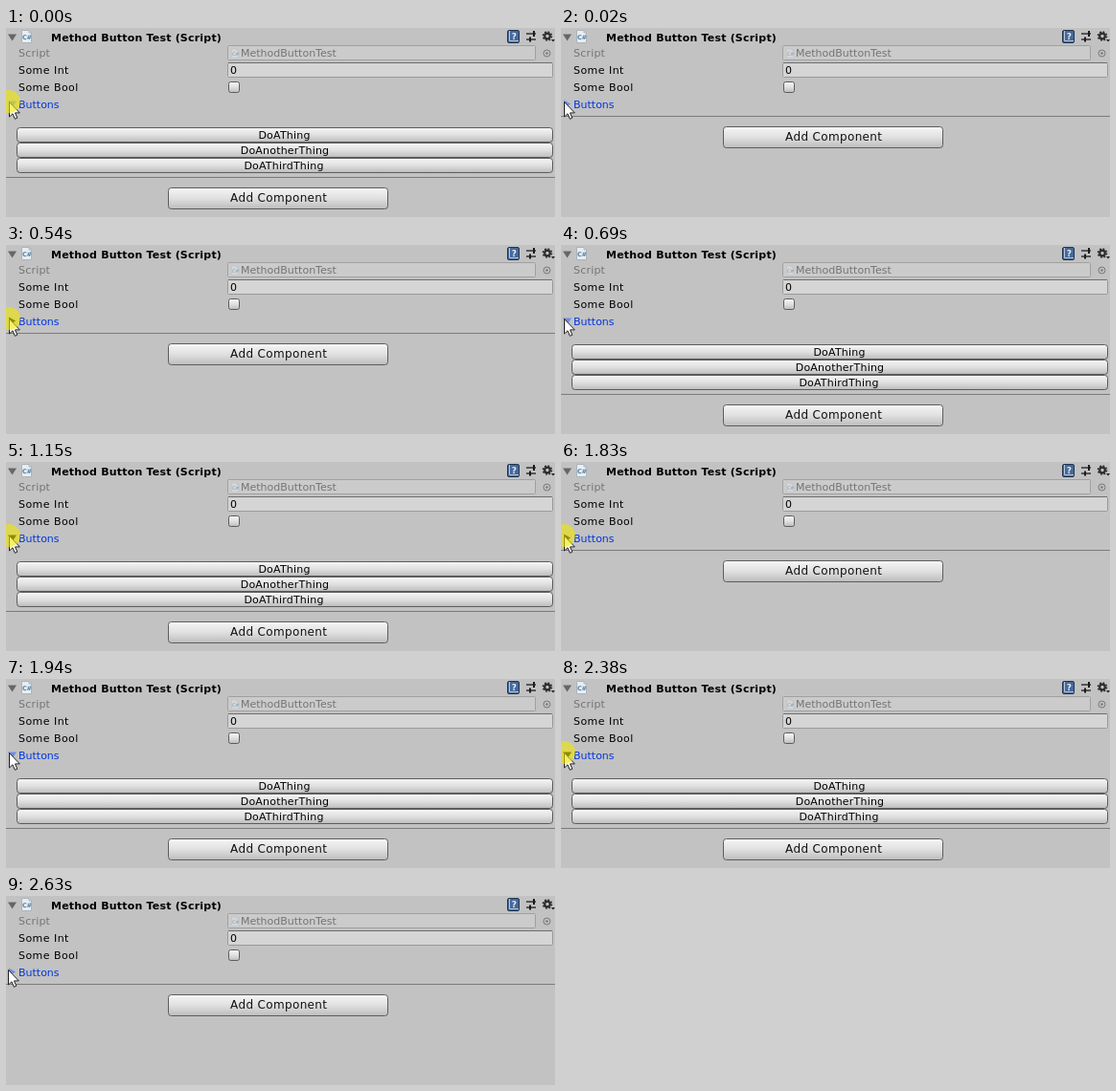
Write an HTML page that moves like this. It is 573 px wide and 198 px high and loops after 2.78 s.

```html
<!DOCTYPE html>
<html lang="en">
<head>
<meta charset="utf-8">
<title>Method Button Test</title>
<style>
  html, body { margin: 0; width: 100%; height: 100%; overflow: hidden; background: #c2c2c2; }
  svg { display: block; width: 573px; height: 198px; }
  text { font: 11px "DejaVu Sans", sans-serif; letter-spacing: .2px; }
  .label { letter-spacing: .45px; }
  .title { font-weight: bold; }
  .dim { fill: #747474; }
  .focus { fill: #0035e0; }
  .tight { letter-spacing: 0; }
  .mid { text-anchor: middle; }
  .add { font-size: 12px; letter-spacing: .35px; fill: #111; }
  .btn { fill: url(#face); stroke: #5c5c5c; }

  .open, .closed, .footer, .glow, .arrow, .cursor { animation: 2780ms step-end infinite; }
  .open { animation-name: open; }
  .closed { animation-name: closed; }
  .footer { animation-name: footer; }
  .glow { animation-name: glow; }
  .arrow { animation-name: arrow; }
  .cursor { animation-name: cursor; }

  @keyframes open {
    0%, 24.8201%, 69.7842% { visibility: visible; }
    .7194%, 48.5612%, 91.0072%, 100% { visibility: hidden; }
  }
  @keyframes closed {
    0%, 24.8201%, 69.7842% { visibility: hidden; }
    .7194%, 48.5612%, 91.0072%, 100% { visibility: visible; }
  }
  @keyframes footer {
    0%, 24.8201%, 69.7842% { transform: none; }
    .7194%, 48.5612%, 91.0072%, 100% { transform: translateY(-64px); }
  }
  @keyframes glow {
    0%, 19.4245%, 41.3669%, 65.8273%, 85.6115% { visibility: visible; }
    .7194%, 24.8201%, 48.5612%, 69.7842%, 91.0072%, 100% { visibility: hidden; }
  }
  @keyframes arrow {
    0%, .7194%, 24.8201%, 48.5612%, 69.7842%, 91.0072%, 100% { fill: #6f8ee0; }
    19.4245%, 41.3669%, 65.8273%, 85.6115% { fill: #000; }
  }
  @keyframes cursor {
    0% { transform: none; }
    94.6043%, 100% { transform: translateX(-1px); }
  }
</style>
</head>
<body>
<svg viewBox="0 0 573 198">
  <defs>
    <linearGradient id="face" x2="0" y2="1">
      <stop offset="0" stop-color="#f6f6f6"/>
      <stop offset=".5" stop-color="#e0e0e0"/>
      <stop offset="1" stop-color="#bcbcbc"/>
    </linearGradient>
    <g id="page">
      <path d="M.5 .5H8L10.500 3V13.500H.5Z" fill="#e9edf0" stroke="#aab4bc"/>
      <path d="M8 .5V3H10.500" fill="none" stroke="#aab4bc"/>
    </g>
  </defs>
  <rect width="573" height="198" fill="#c2c2c2"/>

  <!-- header -->
  <path d="M2 6.500H11L6.500 13.500Z" fill="#666"/>
  <use href="#page" x="16" y="2"/>
  <text x="17" y="12" style="font-size:6.5px;font-weight:bold;letter-spacing:-.3px" fill="#4a7fa8">C#</text>
  <text class="title" x="47" y="14">Method Button Test (Script)</text>
  <rect x="523.500" y="2.500" width="12" height="13" rx="1.500" fill="#46699a" stroke="#22344e"/>
  <path d="M525.500 3V13.500H535" fill="none" stroke="#b9c9dd"/>
  <text class="title mid" x="530.500" y="11.500" style="font-size:9px" fill="#e8eef5">?</text>
  <path d="M543 6H553M543 12H553" stroke="#333" stroke-width="1.500"/>
  <path d="M551 3V9M547 9.500V14.500" stroke="#1c1c1c" stroke-width="2"/>
  <g fill="none" stroke="#2c2c2c">
    <circle cx="565" cy="8.500" r="2.800" stroke-width="2.200"/>
    <circle cx="565" cy="8.500" r="4.500" stroke-width="1.600" stroke-dasharray="1.800 1.734"/>
  </g>
  <path d="M569 12H573L571 14.500Z" fill="#222"/>

  <!-- fields -->
  <text class="dim" x="13" y="30">Script</text>
  <rect x="231.500" y="18.500" width="321" height="15" rx="1" fill="#cbcbcb" stroke="#a0a0a0"/>
  <use href="#page" transform="translate(235 21.500) scale(.75)" opacity=".35"/>
  <text x="236" y="28.500" style="font-size:5px;letter-spacing:-.2px" fill="#7f9fb4">C#</text>
  <text class="dim tight" x="245" y="30">MethodButtonTest</text>
  <circle cx="564.500" cy="26.500" r="3.500" fill="none" stroke="#777"/>
  <circle cx="564.500" cy="26.500" r="1.200" fill="#777"/>

  <text class="label" x="13" y="48">Some Int</text>
  <rect x="231.500" y="36.500" width="339" height="15" rx="1" fill="#d5d5d5" stroke="#9a9a9a"/>
  <path d="M232 36.500H570" stroke="#6e6e6e"/>
  <text x="234" y="48">0</text>

  <text class="label" x="13" y="66">Some Bool</text>
  <rect class="btn" x="232.500" y="56.500" width="11" height="11" rx="2"/>
  <text class="focus tight" x="13" y="84">Buttons</text>

  <!-- foldout content -->
  <g class="open">
    <rect class="btn" x="11.500" y="104.500" width="559" height="15" rx="3"/>
    <rect class="btn" x="11.500" y="120.500" width="559" height="15" rx="3"/>
    <rect class="btn" x="11.500" y="136.500" width="559" height="15" rx="3"/>
    <text class="mid" x="290.500" y="116">DoAThing</text>
    <text class="mid" x="291" y="132">DoAnotherThing</text>
    <text class="mid" x="290" y="148">DoAThirdThing</text>
  </g>
  <g class="footer">
    <path d="M0 156.500H573" stroke="#7b7b7b"/>
    <rect class="btn" x="169.500" y="167.500" width="229" height="22" rx="3"/>
    <text class="mid add" x="284.700" y="182">Add Component</text>
  </g>

  <!-- pointer, tinted by the click highlight -->
  <g class="arrow">
    <path class="open" d="M2 76.500H11L6.500 83.500Z"/>
    <path class="closed" d="M3 75.500L10 79.500L3 84Z"/>
  </g>
  <path class="cursor" d="M3.500 77.500V93L7 89.800L9.300 95.300L11.800 94.200L9.500 88.900H14.300Z" fill="#fff" stroke="#222"/>
  <circle class="glow" cx="3" cy="77" r="12" fill="#f0e600" opacity=".6"/>
</svg>
</body>
</html>
```
